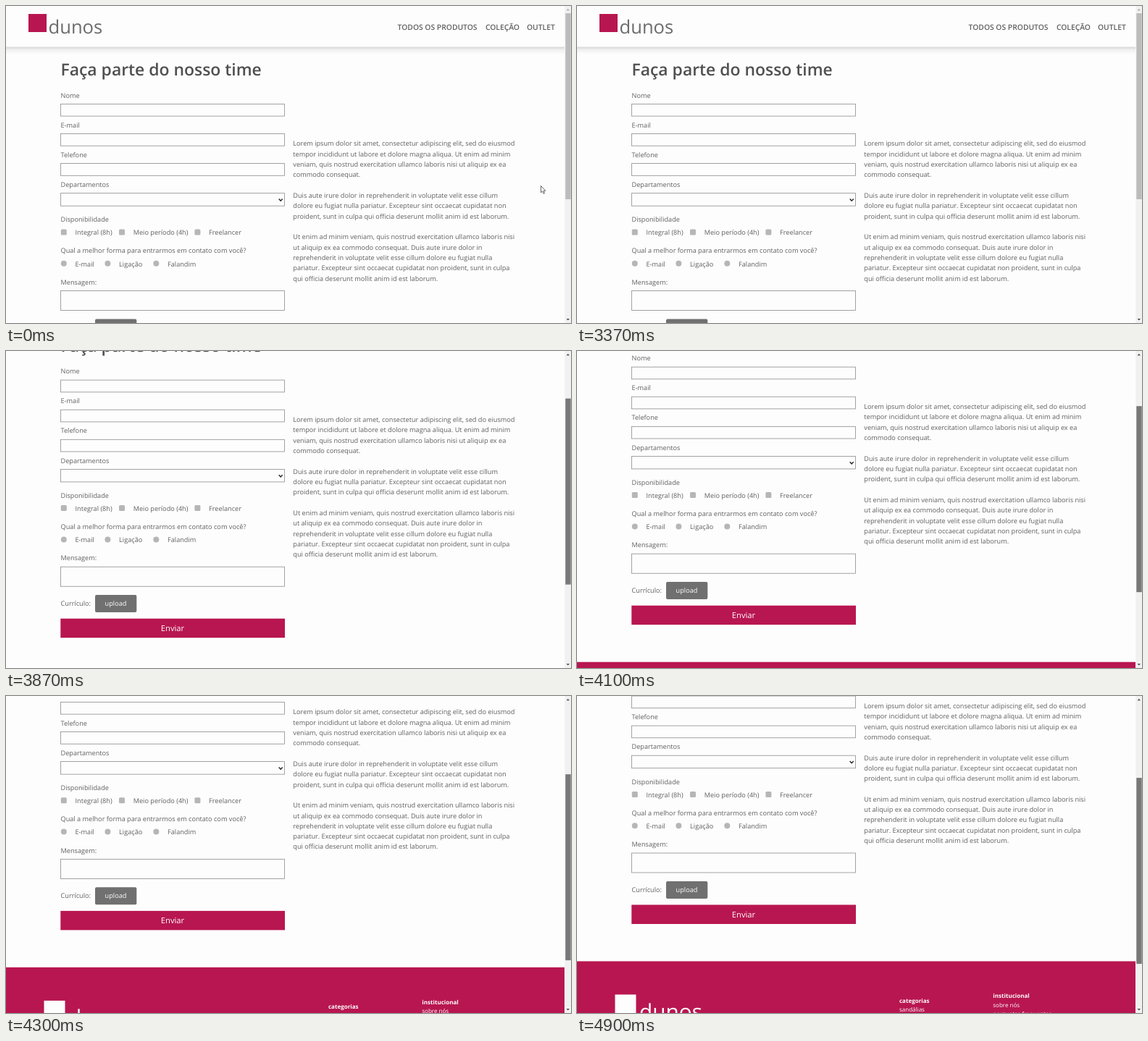
These frames come from a looping animation (780x438 px, 6270 ms). An HTML page:

```html
<!DOCTYPE html>
<html lang="pt-BR">
<head>
<meta charset="utf-8">
<title>Faça parte do nosso time</title>
<style>
  html, body { margin: 0; width: 100%; height: 100%; overflow: hidden; background: #fdfdfd; }
  svg { display: block; width: 100%; height: 100%; }
  text { font: 9.17px "Open Sans", sans-serif; fill: #606060; text-rendering: geometricPrecision; white-space: pre; }
  .title { font-size: 22.93px; font-weight: 600; fill: #505050; }
  .nav text { font-size: 10.32px; font-weight: 600; }
  .brand { font-size: 25.6px; fill: #6c6c6c; }
  .field { fill: none; stroke: #8c8c8c; stroke-width: .8; }
  .choice { fill: #b6b6b6; }
  .button text { fill: #fdfdfd; text-anchor: middle; }
  .button .send { font-size: 11.2px; }
  .footer text { font-size: 8.03px; fill: #fdfdfd; }
  .footer .brand { font-size: 29.8px; }
  .footer .head { font-weight: 700; }
</style>
</head>
<body>
<svg viewBox="0 0 780 438">
  <defs>
    <linearGradient id="shadow" x2="0" y2="1">
      <stop offset="0" stop-color="#d6d6d6"/>
      <stop offset=".4" stop-color="#f0f0f0"/>
      <stop offset="1" stop-color="#fdfdfd"/>
    </linearGradient>
  </defs>
  <rect width="780" height="438" fill="#fdfdfd"/>

  <g id="page">
    <rect y="56.5" width="771" height="10" fill="url(#shadow)"/>
    <rect x="31" y="11" width="25" height="25" fill="#b81650"/>
    <text class="brand" x="58.5" y="37.5">dunos</text>
    <g class="nav">
      <text x="540.6" y="33.1">TODOS OS PRODUTOS</text>
      <text x="661.9" y="33.1">COLEÇÃO</text>
      <text x="719" y="33.1">OUTLET</text>
    </g>

    <text class="title" x="75.5" y="95.8">Faça parte do nosso time</text>
    <g id="form"></g>
    <path d="M376.7 266.6l2.5 2.6 2.5-2.6" fill="none" stroke="#222" stroke-width="1.4"/>
    <text x="75.5" y="447.2">Currículo:</text>
    <g class="button">
      <rect x="123" y="432.4" width="57.3" height="24" rx="2" fill="#707070"/>
      <text x="151.5" y="447.2">upload</text>
      <rect x="75.3" y="465" width="309.7" height="26.5" fill="#b81650"/>
      <text class="send" x="230" y="482.3">Enviar</text>
    </g>
    <g id="article"></g>

    <g class="footer">
      <rect y="543" width="771" height="200" fill="#b81650"/>
      <rect x="52.5" y="589" width="29" height="29" fill="#fdfdfd"/>
      <text class="brand" x="86" y="623.5">dunos</text>
      <text class="head" x="445" y="600">categorias</text>
      <text x="445" y="612.6">sandálias</text>
      <text class="head" x="574.3" y="593.6">institucional</text>
      <text x="574.3" y="606.2">sobre nós</text>
      <text x="574.3" y="618.8">perguntas frequentes</text>
    </g>
  </g>

  <rect x="771.3" width="8.7" height="438" fill="#f1f1f1"/>
  <path id="up" d="M773.6 6.3h4.4l-2.2-2.6z"/>
  <path d="M773.6 432h4.4l-2.2 2.6z" fill="#505050"/>
  <rect id="thumb" x="772.3" width="7.4" height="257"/>
  <path id="cursor" d="M738.5 248.5v9.3l2.1-1.9 1.5 3.4 1.5-.7-1.5-3.3h2.8z"
        fill="#fdfdfd" stroke="#404040" stroke-width=".8"/>
</svg>

<script>
const $ = id => document.getElementById(id);
const label = (x, y, s) => `<text x="${x}" y="${y}">${s}</text>`;
const field = (y, h) => `<rect class="field" x="75.5" y="${y}" width="309" height="${h}"/>`;
const choices = (y, radius, items) => items.map(([x, s]) =>
  `<rect class="choice" x="${x - 4}" y="${y - 7.8}" width="8" height="8" rx="${radius}"/>` +
  label(x + 15.7, y, s)).join('');

$('form').innerHTML =
  ['Nome', 'E-mail', 'Telefone', 'Departamentos'].map((s, i) =>
    label(75.5, 126.5 + i * 41.1, s) + field(135.4 + i * 41.1, i < 3 ? 16.7 : 17.5)).join('') +
  label(75.5, 298, 'Disponibilidade') +
  choices(316.2, 1.5, [[79.8, 'Integral (8h)'], [160, 'Meio período (4h)'], [264.4, 'Freelancer']]) +
  label(75.5, 341.3, 'Qual a melhor forma para entrarmos em contato com você?') +
  choices(359.5, 4, [[79.8, 'E-mail'], [140.4, 'Ligação'], [207.3, 'Falandim']]) +
  label(75.5, 384.7, 'Mensagem:') + field(393.5, 27);

$('article').innerHTML = `Lorem ipsum dolor sit amet, consectetur adipiscing elit, sed do eiusmod
tempor incididunt ut labore et dolore magna aliqua. Ut enim ad minim
veniam, quis nostrud exercitation ullamco laboris nisi ut aliquip ex ea
commodo consequat.

Duis aute irure dolor in reprehenderit in voluptate velit esse cillum
dolore eu fugiat nulla pariatur. Excepteur sint occaecat cupidatat non
proident, sunt in culpa qui officia deserunt mollit anim id est laborum.

Ut enim ad minim veniam, quis nostrud exercitation ullamco laboris nisi
ut aliquip ex ea commodo consequat. Duis aute irure dolor in
reprehenderit in voluptate velit esse cillum dolore eu fugiat nulla
pariatur. Excepteur sint occaecat cupidatat non proident, sunt in culpa
qui officia deserunt mollit anim id est laborum.`
  .split('\n').map((s, i) => label(396.3, 193.4 + i * 14.32, s)).join('');

const LOOP = 6270, DRAG_START = 3500, CURSOR_END = 530;
// Scrollbar drag: [time, scroll, speed in px/ms]
const drag = [[DRAG_START, 0, 0], [3870, 95.2, .08], [4100, 113.2, .08], [4300, 168, .08], [4600, 176.5, 0]];

function scrollAt(t) {
  if (t <= DRAG_START) return 0;
  const i = drag.findIndex(key => key[0] > t);
  if (i < 0) return drag.at(-1)[1];
  const [t0, p0, v0] = drag[i - 1], [t1, p1, v1] = drag[i];
  const d = t1 - t0, u = (t - t0) / d, w = 1 - u;
  return w * w * ((1 + 2 * u) * p0 + u * d * v0) + u * u * ((1 + 2 * w) * p1 - w * d * v1);
}

function draw(now) {
  const t = now % LOOP, scroll = scrollAt(t), dragging = t >= DRAG_START;
  $('page').setAttribute('transform', `translate(0 ${-scroll})`);
  $('thumb').setAttribute('y', 10 + scroll / 1.712);
  $('thumb').setAttribute('fill', dragging ? '#787878' : '#bcbcbc');
  $('up').setAttribute('fill', dragging ? '#505050' : '#a8a8a8');
  $('cursor').setAttribute('visibility', t < CURSOR_END ? 'visible' : 'hidden');
}

const start = performance.now();
function tick() {
  draw(performance.now() - start);
  requestAnimationFrame(tick);
}
tick();
</script>
</body>
</html>
```
